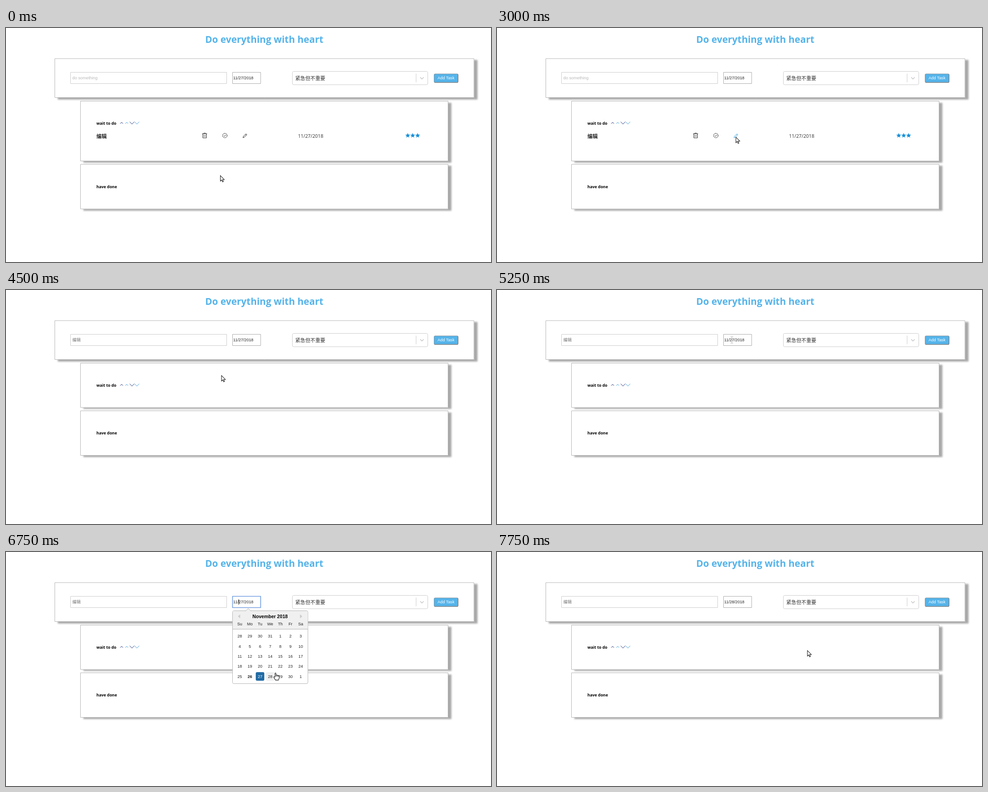
An HTML page with a canvas that plays this animation: 1078 px wide and 520 px high, repeating every 8000 ms.

```html
<!DOCTYPE html>
<html lang="en">
<head>
<meta charset="utf-8">
<title>Task list</title>
<style>
html, body { margin: 0; width: 100%; height: 100%; overflow: hidden; background: #fff; }
canvas { display: block; width: 1078px; height: 520px; }
</style>
</head>
<body>
<canvas id="stage" width="1078" height="520"></canvas>
<script>
const ctx = document.getElementById('stage').getContext('2d');
const LOOP = 8000;
const HEADING = '"Open Sans", "Noto Sans", sans-serif';
const FORM = '"Liberation Sans", Arial, sans-serif';
const CJK = '"Noto Sans CJK SC", "Noto Sans CJK", sans-serif';
const INK = '#222', BLUE = '#1890d8', SKY = '#55b4ea', NAVY = '#1b2a72';

// start time, pointer shape, hot spot
const POINTER = [
  [0, arrow, 476.5, 328], [250, arrow, 501.5, 269], [500, arrow, 530.5, 248],
  [750, arrow, 531, 242], [1000, arrow, 531, 242.5], [1500, hand, 531, 241.5],
  [3000, arrow, 531, 242.5], [4000, arrow, 513.5, 241.5], [4250, arrow, 484, 216.5],
  [4500, arrow, 479, 190], [4750, arrow, 501.5, 147.5], [5000, beam, 528, 111],
  [5250, beam, 522, 111], [5500, beam, 524, 111], [6000, hand, 580, 193],
  [6250, hand, 593, 236], [6500, hand, 600, 263], [6750, hand, 599, 268.5],
  [7250, arrow, 592, 270], [7750, arrow, 690, 219]
];

const within = (t, from, to) => t >= from && t < to;

function text(str, x, y, font, color = INK, align = 'left') {
  ctx.font = font;
  ctx.fillStyle = color;
  ctx.textAlign = align;
  ctx.fillText(str, x, y);
}

function line(points, color, width = 1, close = false, fill = null) {
  ctx.beginPath();
  points.forEach(([x, y]) => ctx.lineTo(x, y));
  if (close) ctx.closePath();
  if (fill) { ctx.fillStyle = fill; ctx.fill(); }
  if (color) { ctx.strokeStyle = color; ctx.lineWidth = width; ctx.stroke(); }
}

function box(x, y, w, h, { fill, stroke, radius = 0, width = 1 }) {
  ctx.beginPath();
  ctx.roundRect(x, y, w, h, radius);
  if (fill) { ctx.fillStyle = fill; ctx.fill(); }
  if (stroke) { ctx.strokeStyle = stroke; ctx.lineWidth = width; ctx.stroke(); }
}

function panel(x, y, w, h) {
  ctx.save();
  ctx.shadowColor = '#a8a8a8';
  ctx.shadowOffsetX = 7;
  ctx.shadowOffsetY = 3.5;
  ctx.shadowBlur = 3.5;
  box(x, y, w, h, { fill: '#fff' });
  ctx.restore();
  box(x + .5, y + .5, w - 1, h - 1, { stroke: '#b4b4b4' });
}

function at(x, y, scale, draw) {
  ctx.save();
  ctx.translate(x, y);
  ctx.scale(scale, scale);
  draw();
  ctx.restore();
}

function arrow(x, y) {
  at(x, y, .75, () => line(
    [[0, 0], [0, 16.5], [3.8, 13], [6.4, 18.8], [9, 17.7], [6.5, 12], [11.6, 12]],
    '#111', 1.4, true, '#fff'));
}

function hand(x, y) {
  at(x, y, .75, () => {
    ctx.beginPath();
    ctx.moveTo(-1.5, 13);
    ctx.lineTo(-1.5, 1.5);
    ctx.quadraticCurveTo(0, -1, 1.5, 1.5);
    ctx.lineTo(1.5, 7);
    ctx.quadraticCurveTo(4, 5.5, 5, 7.8);
    ctx.quadraticCurveTo(7.5, 6.7, 8.3, 8.8);
    ctx.quadraticCurveTo(11, 8, 11, 11);
    ctx.lineTo(11, 15);
    ctx.lineTo(8.8, 21.5);
    ctx.lineTo(0, 21.5);
    ctx.lineTo(-5, 13.5);
    ctx.quadraticCurveTo(-5.5, 9.5, -1.5, 13);
    ctx.fillStyle = '#fff';
    ctx.fill();
    ctx.strokeStyle = '#111';
    ctx.lineWidth = 1.4;
    ctx.stroke();
    [1.5, 5, 8.3].forEach(px => line([[px, 7.5], [px, 11.5]], '#111', 1.2));
  });
}

function beam(x, y) {
  const c = '#b9b9b9';
  line([[x, y - 7], [x, y + 7]], c);
  [-7, 7].forEach(dy => line([[x - 3, y + dy], [x + 3, y + dy]], c));
}

function trash(x, y) {
  line([[x - 5.5, y - 4], [x + 5.5, y - 4]], INK);
  line([[x - 2, y - 4], [x - 2, y - 5.5], [x + 2, y - 5.5], [x + 2, y - 4]], INK, .9);
  line([[x - 4, y - 4], [x - 4, y + 5.2], [x + 4, y + 5.2], [x + 4, y - 4]], INK);
  [-1.4, 1.4].forEach(dx => line([[x + dx, y - 1.5], [x + dx, y + 3]], INK, .8));
}

function check(x, y, color) {
  ctx.beginPath();
  ctx.arc(x, y, 5, 0, Math.PI * 2);
  ctx.strokeStyle = color;
  ctx.lineWidth = 1;
  ctx.setLineDash([3.2, .8]);
  ctx.stroke();
  ctx.setLineDash([]);
  line([[x - 2.4, y], [x - .6, y + 1.8], [x + 2.8, y - 1.8]], color);
}

function pencil(x, y, color) {
  line([[x - 4.2, y + 4.6], [x - 3.4, y + 1.6], [x + 2.4, y - 4.2], [x + 4.4, y - 2.4],
    [x - 1.5, y + 3.6]], color, 1, true);
  line([[x + 1, y - 2.8], [x + 3, y - 1]], color, .8);
}

function star(x, y) {
  const points = Array.from({ length: 10 }, (_, i) => {
    const r = i % 2 ? 2.6 : 5.7, a = i * Math.PI / 5 - Math.PI / 2;
    return [x + r * Math.cos(a), y + r * Math.sin(a)];
  });
  line(points, null, 1, true, BLUE);
}

function chevron(x, y, w, h, color, width = 1) {
  line([[x - w, y - h], [x, y + h], [x + w, y - h]], color, width);
}

function form(t) {
  const focused = within(t, 5500, 7250);
  text('Do everything with heart', 574, 33, `bold 21px ${HEADING}`, SKY, 'center');
  panel(108, 67.5, 932.5, 87.5);

  box(143.5, 98.5, 347, 25, { fill: '#fff', stroke: '#ccc' });
  if (t < 3250) text('do something', 147.5, 114, `9.3px ${FORM}`, '#b8b8b8');
  else text('编辑', 147.5, 114.3, `9.3px ${CJK}`, '#777');

  box(503.5, 98.5, 62.5, 25, { fill: '#fff', stroke: focused ? '#6f9be0' : '#aaa', width: focused ? 1.6 : 1 });
  text(t < 7250 ? '11/27/2018' : '11/28/2018', 505, 114, `9.1px ${FORM}`);
  if (focused && !within(t, 6000, 6500)) line([[517.5, 105], [517.5, 117]], '#111');

  box(636.5, 96.5, 301, 29.5, { fill: '#fff', stroke: '#ccc', radius: 3 });
  text('紧急但不重要', 643, 116, `11.1px ${CJK}`, '#333');
  line([[911.5, 101.5], [911.5, 120.5]], '#ccc');
  chevron(924.5, 111.5, 3.8, 2, '#c4c4c4', 1.5);

  box(951.5, 102, 53.5, 19, { fill: SKY, stroke: '#8a9299', radius: 2 });
  line([[952, 121], [1004.5, 121], [1004.5, 103]], '#777');
  text('Add Task', 978, 114, `9.1px ${FORM}`, '#fff', 'center');
}

function task(t) {
  text('编辑', 201, 244.5, `bold 11.5px ${CJK}`);
  trash(441.5, 239);
  check(486.5, 239, within(t, 500, 750) ? BLUE : INK);
  pencil(531, 239.3, t >= 1000 ? '#3d9fdb' : INK);
  text('11/27/2018', 649, 244.3, `10.6px ${HEADING}`, '#333');
  [893, 904, 915].forEach(x => star(x, 239));
}

function lists(t) {
  const shift = t < 3250 ? 34.5 : 0;
  panel(165, 162, 818, 99.5 + shift);
  text('wait to do', 201, 215, `bold 8.8px ${HEADING}`, '#000');
  chevron(257, 211, 3, -1.6, NAVY);
  chevron(268.3, 211, 3, -1.6, '#3b9bd6');
  chevron(280, 211, 5, 2.6, NAVY);
  chevron(291, 211, 5, 2.6, '#3b9bd6');
  if (shift) task(t);
  panel(165, 268 + shift, 818, 100);
  text('have done', 201, 321.3 + shift, `bold 8.8px ${HEADING}`, '#000');
}

function calendar(t) {
  const col = i => 519.5 + 22.57 * i, row = i => 190.2 + 22.35 * i;
  const border = '#b4b4b4';
  box(503.5, 130.5, 167.5, 162, { fill: '#fff', stroke: border, radius: 3 });
  box(504, 131, 166.5, 40, { fill: '#f0f0f0', radius: [3, 3, 0, 0] });
  line([[504, 171.5], [671, 171.5]], border);
  line([[532.5, 131.3], [538.5, 125.3], [544.5, 131.3]], border, 1, false, '#f0f0f0');
  line([[515.5, 143], [520.5, 138.5], [520.5, 147.5]], null, 1, true, '#ccc');
  line([[658.5, 143], [653.5, 138.5], [653.5, 147.5]], null, 1, true, '#ccc');
  text('November 2018', 587, 146.5, `bold 10.6px ${FORM}`, '#000', 'center');
  'Su Mo Tu We Th Fr Sa'.split(' ').forEach((name, i) =>
    text(name, col(i), 163, `9px ${FORM}`, INK, 'center'));

  for (let i = 0; i < 35; i++) {
    const date = new Date(2018, 9, 28 + i), day = date.getDate();
    const november = date.getMonth() === 10;
    const x = col(i % 7), y = row(Math.floor(i / 7));
    const selected = november && day === 27;
    if (selected) box(x - 9.5, y - 12.6, 19, 19, { fill: '#216ba5', radius: 3 });
    if (november && day === 28 && t >= 6750) box(x - 9.5, y - 12.6, 19, 19, { fill: '#f0f0f0', radius: 3 });
    const weight = november && day === 26 ? 'bold ' : '';
    text(day, x, y, `${weight}9px ${FORM}`, selected ? '#fff' : INK, 'center');
  }
}

function render(now) {
  const t = now % LOOP;
  ctx.fillStyle = '#fff';
  ctx.fillRect(0, 0, 1078, 520);
  form(t);
  lists(t);
  if (within(t, 5500, 7250)) calendar(t);
  const [, shape, x, y] = POINTER.findLast(([start]) => start <= t) || POINTER[0];
  shape(x, y);
  requestAnimationFrame(() => render(performance.now()));
}

render(0);
</script>
</body>
</html>
```
